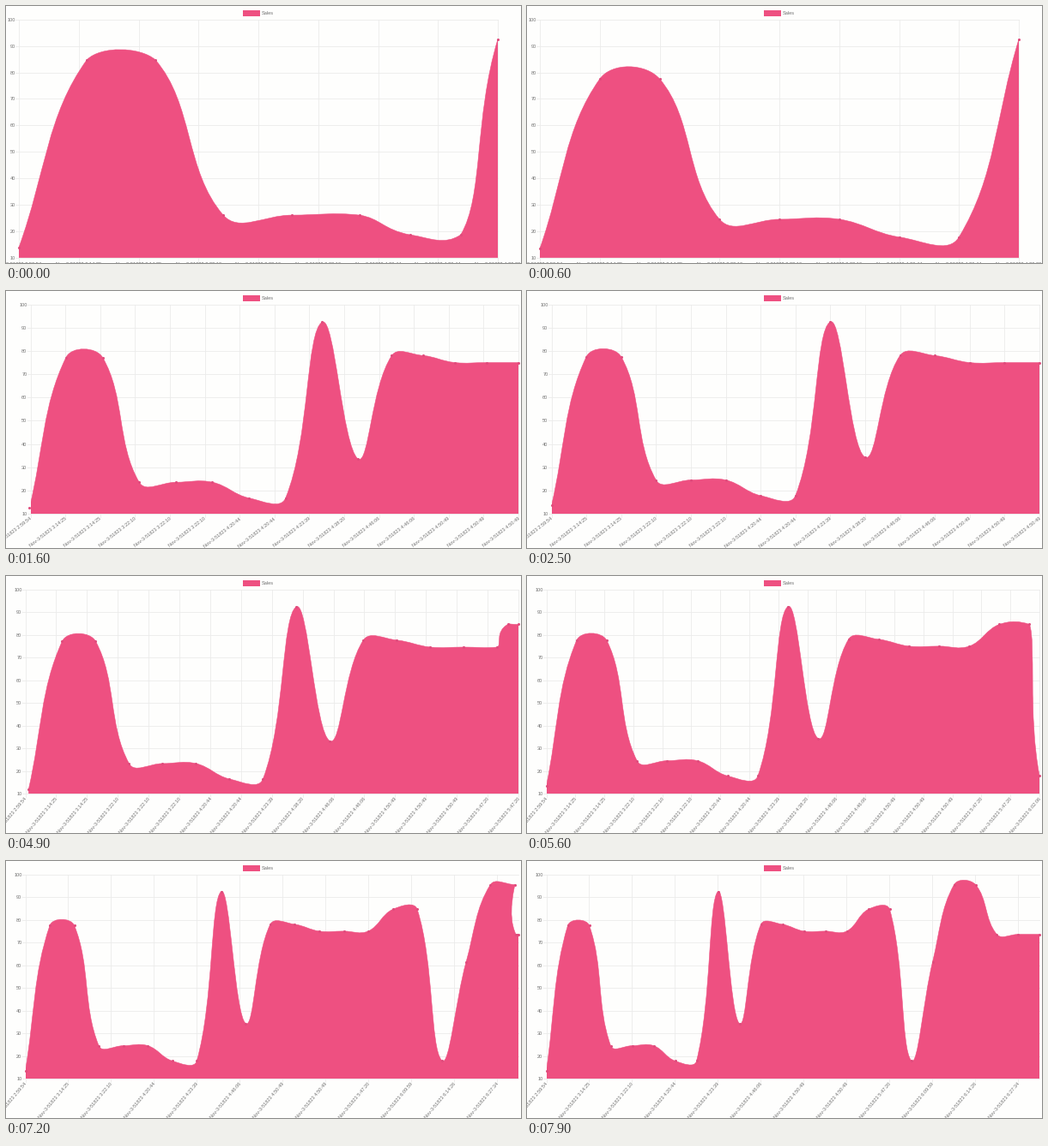
Recreate the animation shown at these times as a matplotlib script. Size 600 px wide and 300 px high, loop 8000 ms.

```python
import numpy as np
import matplotlib.pyplot as plt
from matplotlib.animation import FuncAnimation
from matplotlib.patches import PathPatch, Rectangle
from matplotlib.path import Path

W, H, FPS, FRAMES = 600, 300, 10, 80
TOP = 15.7
PINK, DOT, GRID, INK = "#ee5081", "#e04b7c", "#ebebeb", "#727272"
FONT_PX = 5.6
TENSION = 0.4

SALES = [13.5, 77.5, 77.5, 24.5, 24.5, 24.5, 17.8, 17.8, 92.5, 34.3, 78, 78,
         75, 75, 75, 84.6, 84.6, 18, 61.5, 95.5, 95.5, 73.6, 73.6, 73.6]
TIMES = (["2:59:54"] + ["3:14:25"] * 2 + ["3:22:10"] * 3 + ["4:20:44"] * 2
         + ["4:23:39", "4:38:20"] + ["4:46:06"] * 2 + ["4:50:49"] * 3
         + ["5:47:20"] * 2 + ["6:02:06", "6:09:59"] + ["6:14:26"] * 2
         + ["6:27:34"] * 3)

# (point count after the update, start of its transition in ms)
UPDATES = [(8, -381), (9, -215), (10, 715), (15, 1150), (17, 4800),
           (18, 5500), (19, 6178), (21, 6500), (24, 7185)]
FIRST_COUNT = 6
DURATION = 1000


def layout(n):
    """Left, right and bottom of the plot area, and the label angle."""
    if n <= 10:
        return 15, 573, 293.8, 0
    if n <= 15:
        return 28.5, 597, 260, 38
    return 22.5, 597, 254, 50


def y_pixel(value, bottom, top_value=100):
    return bottom - (value - 10) / (top_value - 10) * (bottom - TOP)


def model(n):
    """Settled points as an array (n, 3, 2): handle in, point, handle out."""
    left, right, bottom, _ = layout(n)
    values = np.array(SALES[:n])
    top_value = np.ceil(values.max() / 10) * 10
    pts = np.column_stack([np.linspace(left, right, n),
                           y_pixel(values, bottom, top_value)])
    prev = np.vstack([pts[:1], pts[:-1]])
    nxt = np.vstack([pts[1:], pts[-1:]])
    d_in = np.hypot(*(pts - prev).T)
    d_out = np.hypot(*(nxt - pts).T)
    total = d_in + d_out
    chord = nxt - prev
    h_in = pts - chord * (TENSION * d_in / total)[:, None]
    h_out = pts + chord * (TENSION * d_out / total)[:, None]
    low, high = (left, TOP), (right, bottom)
    return np.stack([np.clip(h_in, low, high), pts,
                     np.clip(h_out, low, high)], axis=1)


def view(k, t):
    """Points at time t during update k; new ones enter at the right edge."""
    n, t0 = UPDATES[k]
    old = view(k - 1, t0) if k else model(FIRST_COUNT)
    new = [model(i + 1)[i] for i in range(len(old), n)]
    start = np.concatenate([old, new])
    p = np.clip((t - t0) / DURATION, 0, 1)
    ease = 1 - (1 - p) ** 4
    return start + (model(n) - start) * ease


fig = plt.figure(figsize=(W / 100, H / 100), dpi=100, facecolor="#fefefd")
ax = fig.add_axes([0, 0, 1, 1])


def text(x, y, s, ha="left", angle=0):
    a = np.radians(angle)
    drop = 0.36 * FONT_PX
    ax.text(x + drop * np.sin(a), y + drop * np.cos(a), s, ha=ha, va="baseline",
            rotation=angle, rotation_mode="anchor", color=INK,
            family="Liberation Sans", size=FONT_PX * 0.72)


def draw_axes(n):
    left, right, bottom, angle = layout(n)
    for v in range(10, 101, 10):
        y = y_pixel(v, bottom)
        ax.plot([left - 4, right], [y, y], color=GRID, lw=0.6, zorder=1)
        text(left - 4, y, str(v), "right")
    xs = np.linspace(left, right, n)
    for i in range(0, n, 2 if n > 20 else 1):
        x = xs[i]
        ax.plot([x, x], [TOP, bottom + 4], color=GRID, lw=0.6, zorder=1)
        label = "Nov-3-51823 " + TIMES[i]
        if angle:
            text(x + 0.5, bottom + 5, label, "right", angle)
        else:
            text(x, bottom + 7, label, "center")


def draw_area(nodes, n):
    left, right, bottom, _ = layout(n)
    pts = nodes[:, 1]
    curve = nodes.reshape(-1, 2)[1:-1]
    verts = np.vstack([curve, [pts[-1, 0], bottom], [pts[0, 0], bottom], pts[0]])
    codes = ([Path.MOVETO] + [Path.CURVE4] * (len(curve) - 1)
             + [Path.LINETO] * 2 + [Path.CLOSEPOLY])
    area = ax.add_patch(PathPatch(Path(verts, codes), fc=PINK, ec=PINK,
                                  lw=0.4, zorder=2))
    clip = Rectangle((left, TOP), right - left, bottom - TOP,
                     transform=ax.transData)
    area.set_clip_path(clip)
    ax.plot(pts[:, 0], pts[:, 1], "o", ms=2.2, mfc=DOT, mec="none", zorder=3)


def update(frame):
    t = frame * 1000 / FPS
    k = max(i for i, (_, t0) in enumerate(UPDATES) if t0 <= t)
    n = UPDATES[k][0]
    ax.clear()
    ax.set(xlim=(0, W), ylim=(H, 0))
    ax.axis("off")
    draw_axes(n)
    draw_area(view(k, t), n)
    ax.add_patch(Rectangle((276, 5.2), 20, 6.4, fc=PINK, ec="none"))
    text(298, 8.2, "Sales")
    return []


anim = FuncAnimation(fig, update, frames=FRAMES, interval=1000 / FPS,
                     init_func=lambda: [], repeat=True, blit=False)
plt.show()
```
